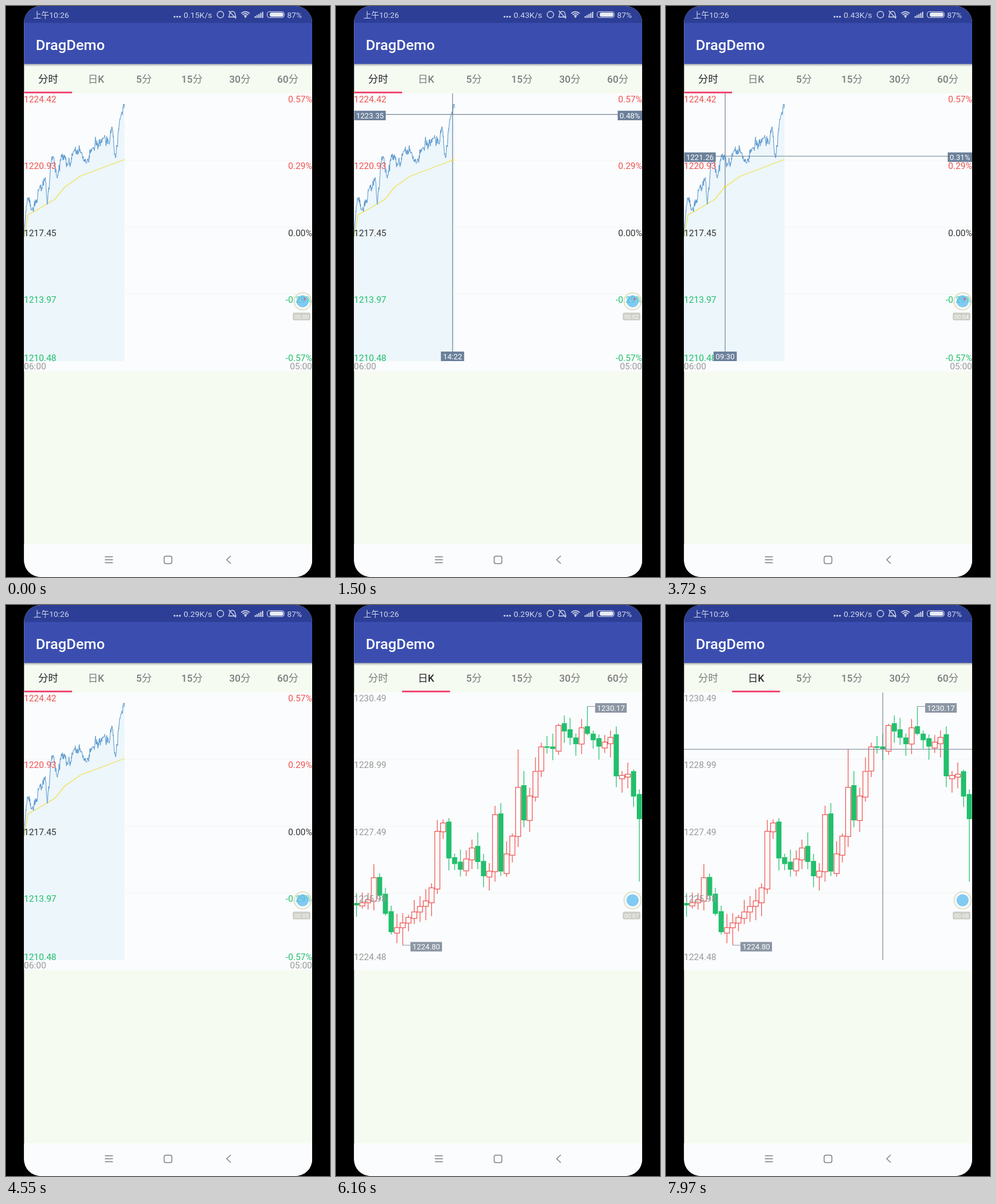
An HTML page with a canvas for the animation above (8000 ms loop, 544x960 px).

```html
<!DOCTYPE html>
<html lang="zh">
<head>
<meta charset="utf-8">
<title>DragDemo</title>
<style>
html, body { margin: 0; width: 100%; height: 100%; overflow: hidden; background: #000; }
canvas { display: block; width: 544px; height: 960px; }
</style>
</head>
<body>
<canvas id="stage" width="544" height="960"></canvas>
<script>
const ctx = document.getElementById('stage').getContext('2d');
const LOOP = 8000, LEFT = 30.5, RIGHT = 514, TOP = 147;
const FONT = 'Roboto, "Noto Sans CJK SC", "Noto Sans CJK", sans-serif';
const BODY = '#f6fbf2', PAPER = '#fbfcfd', ICON = '#d3d9ec', CROSS = '#76889a';
const RED = '#ef5350', GREEN = '#22bf6c', GREY = '#98999a';

// Drawing helpers
function rect(x, y, w, h, color) {
  ctx.fillStyle = color;
  ctx.fillRect(x, y, w, h);
}
function round(x, y, w, h, r) {
  ctx.beginPath();
  ctx.roundRect(x, y, w, h, r);
}
function line(points, color, width = 1.2) {
  ctx.beginPath();
  points.forEach(([x, y]) => ctx.lineTo(x, y));
  ctx.strokeStyle = color;
  ctx.lineWidth = width;
  ctx.stroke();
}
function arc(x, y, r, from = 0, to = Math.PI * 2) {
  ctx.beginPath();
  ctx.arc(x, y, r, from, to);
}
function dot(x, y, r, color) {
  arc(x, y, r);
  ctx.fillStyle = color;
  ctx.fill();
}
function text(str, x, y, size, color, align = 'left', weight = 400) {
  ctx.font = `${weight} ${size}px ${FONT}`;
  ctx.textAlign = align;
  ctx.fillStyle = color;
  ctx.fillText(str, x, y);
}
function tag(str, x, y, w, color) {
  rect(x, y, w, 16, color);
  text(str, x + w / 2, y + 12.7, 12.8, '#fff', 'center');
}

// Motion helpers
const clamp = v => Math.max(0, Math.min(1, v));
const linear = u => u;
const smooth = u => u * u * (3 - 2 * u);
function follow(keys, at, ease = linear) {
  const i = keys.findIndex(k => k[0] >= at);
  if (i === 0) return keys[0][1];
  if (i < 0) return keys[keys.length - 1][1];
  const [x0, y0] = keys[i - 1], [x1, y1] = keys[i];
  return y0 + (y1 - y0) * ease((at - x0) / (x1 - x0));
}
function randomizer(seed) {
  return () => (seed = seed * 16807 % 2147483647) / 2147483647;
}
const labelY = i => Math.min(161.5 + 112.5 * i, 596.5);

// Intraday price: trend through key points, noise between them
const TREND = [
  [30, 388], [36, 322], [43, 343], [56, 308], [66, 288], [69.5, 335], [75.54, 264.7],
  [79, 252], [86, 290], [93, 250], [99.3, 252.5], [103, 268], [113, 245], [127, 246],
  [135, 264], [145, 240], [164, 221], [174, 230], [178, 202], [184.5, 255], [191, 190],
  [195.66, 182.4], [197.5, 165], [199, 172]
];
const AVERAGE = [[30.5, 389], [37, 351], [50, 344], [82, 325], [99, 304], [125, 286], [199, 258]];
const minuteX = m => 30 + m * 0.33;
const hump = u => 4 * u * (1 - u);

function makeSeries() {
  const rand = randomizer(11);
  let drift = 0;
  return Array.from({ length: 513 }, (_, m) => {
    const x = minuteX(m);
    const i = Math.max(1, TREND.findIndex(k => k[0] >= x));
    const u = (x - TREND[i - 1][0]) / (TREND[i][0] - TREND[i - 1][0]);
    drift = drift * 0.75 + (rand() - 0.5) * 14;
    return follow(TREND, x) + drift * hump(u);
  });
}
const series = makeSeries();

// Daily candles: each opens near the last close, wicks are random
const CLOSES = [
  [0, 505], [2, 495], [3, 458], [6, 550], [8, 534], [12, 497], [13, 475], [14, 380], [15, 366],
  [16, 426], [18, 445], [20, 408], [22, 456], [23, 447], [24, 352], [25, 448], [27, 388],
  [28, 306], [29, 362], [32, 238], [34, 242], [35, 202], [38, 234], [39, 206], [42, 238],
  [44, 222], [45, 288], [47, 284], [49, 360]
];
const SPIKES = [[8, 572], [28, 243], [40, 170.5], [49, 465]];

function makeCandles() {
  const rand = randomizer(5);
  const candles = Array.from({ length: 50 }, (_, i) => {
    const close = follow(CLOSES, i), prev = i ? follow(CLOSES, i - 1) : 501;
    const open = prev - Math.sign(close - prev) * 5 * rand();
    const top = Math.min(open, close), bottom = Math.max(open, close);
    return {
      x: 34.5 + i * 9.69, open, close, top, bottom,
      high: top - 2 - 22 * rand(), low: bottom + 2 + 22 * rand()
    };
  });
  SPIKES.forEach(([i, y]) => {
    const c = candles[i];
    c.high = Math.min(c.high, y);
    c.low = Math.max(c.low, y);
  });
  return candles;
}
const candles = makeCandles();

function statusBar(t) {
  rect(30, 0, 485, 29, '#2c3e96');
  text('上午10:26', 46, 20, 13.3, ICON);
  for (let i = 0; i < 3; i++) dot(283 + i * 4.5, 18, 1.6, ICON);
  text((t < 700 ? '0.15' : t < 4500 ? '0.43' : '0.29') + 'K/s', 346, 20, 13.6, ICON, 'right');
  ctx.strokeStyle = ICON;
  ctx.lineWidth = 1.3;
  arc(360, 14.5, 5.5);
  ctx.stroke();
  arc(380, 13.5, 4.5, Math.PI, 0);
  ctx.lineTo(386, 18.5);
  ctx.lineTo(374, 18.5);
  ctx.closePath();
  ctx.stroke();
  line([[374, 8], [386, 21]], ICON);
  for (let r = 3; r < 10; r += 3.2) {
    arc(402, 19, r, -Math.PI * 0.77, -Math.PI * 0.23);
    ctx.lineWidth = 1.7;
    ctx.stroke();
  }
  dot(402, 18.4, 1.4, ICON);
  for (let i = 0; i < 5; i++) rect(417.5 + i * 3.1, 17 - i * 1.8, 2, 3 + i * 1.8, ICON);
  round(438.5, 9.5, 28.5, 10, 4);
  ctx.lineWidth = 1.1;
  ctx.stroke();
  round(443, 11, 22.5, 7, 2.5);
  ctx.fillStyle = '#e6ebf2';
  ctx.fill();
  text('87%', 472, 20, 13.4, ICON);
}

function tabs(t) {
  const press = Math.min(clamp((t - 4950) / 100), clamp((5600 - t) / 300));
  rect(111, 97, 80.5, 50, `rgba(100,100,100,${0.3 * press})`);
  const shade = ctx.createLinearGradient(0, 97, 0, 102);
  shade.addColorStop(0, 'rgba(90,95,110,.5)');
  shade.addColorStop(1, 'rgba(90,95,110,0)');
  rect(30, 97, 485, 5, shade);
  const active = t < 5080 ? 0 : 1;
  ['分时', '日K', '5分', '15分', '30分', '60分'].forEach((name, i) =>
    text(name, 70.7 + i * 80.5, 129, 16.8, i === active ? '#262828' : '#7b7e7c', 'center', 500));
  const slide = smooth(Math.pow(clamp((t - 5000) / 300), 0.82));
  rect(LEFT + slide * 80.5, 144, 80.5, 2.8, '#f2416f');
}

function crosshair(x, y) {
  line([[x, TOP], [x, 597]], CROSS);
  line([[LEFT, y], [RIGHT, y]], CROSS);
}

function intraday(t) {
  const points = series.map((y, m) => [minuteX(m), y]);
  ctx.beginPath();
  [[LEFT, 597], ...points, [199, 597]].forEach(([x, y]) => ctx.lineTo(x, y));
  ctx.fillStyle = '#ecf6fb';
  ctx.fill();
  line(AVERAGE, '#f5df50', 1.3);
  line(points, '#5594cc', 1);

  for (let i = 0; i < 5; i++) {
    const gap = (2 - i) * 3.4849;
    const color = gap > 0 ? RED : gap < 0 ? GREEN : '#333';
    text((1217.45 + gap).toFixed(2), 30, labelY(i), 15, color);
    text((gap / 12.1745).toFixed(2) + '%', RIGHT, labelY(i), 15, color, 'right');
  }
  text('06:00', 30, 611, 15, GREY);
  text('05:00', RIGHT, 611, 15, GREY, 'right');

  if (t < 800 || t > 4200) return;
  const m = Math.round(follow(
    [[800, 508], [1300, 502], [1550, 502], [2500, 138], [2750, 138], [3600, 210]], t, smooth));
  const x = minuteX(m), y = series[m], fill = '#6b809a';
  const price = 1224.42 - (y - 146.4) / 33.6;
  const pad = n => String(n).padStart(2, '0');
  crosshair(x, y);
  dot(x, follow(AVERAGE, x), 2, '#f2d040');
  tag(price.toFixed(2), LEFT, y - 6.3, 53, fill);
  tag((price / 12.1745 - 100).toFixed(2) + '%', 473, y - 6.3, 41, fill);
  tag(`${pad(6 + Math.floor(m / 60))}:${pad(m % 60)}`, x - 19.5, 581, 39, fill);
}

function drawCandle({ x, open, close, top, bottom, high, low }) {
  const rise = close < open, color = rise ? RED : GREEN;
  line([[x, high], [x, top]], color);
  line([[x, bottom], [x, low]], color);
  if (rise) ctx.strokeRect(x - 4.3, top + 0.5, 8.6, Math.max(0, bottom - top - 1));
  else rect(x - 4.3, top, 8.6, Math.max(1, bottom - top), color);
}

function extremeTag(x, y, price, boxY) {
  line([[x, y], [x + 13, y]], '#929aa6');
  tag(price, x + 13, boxY, 53, '#8c96a4');
}

function daily(t) {
  candles.forEach(drawCandle);
  for (let i = 0; i < 5; i++)
    text((1230.49 - i * 1.5024).toFixed(2), 30, labelY(i), 15, GREY);
  const peak = candles.reduce((a, b) => b.high < a.high ? b : a);
  const dip = candles.reduce((a, b) => b.low > a.low ? b : a);
  extremeTag(peak.x, peak.high, '1230.17', peak.high - 5.5);
  extremeTag(dip.x, dip.low, '1224.80', dip.low - 5.5);
  if (t < 6400) return;
  const c = candles[Math.round(follow([[6400, 16], [7140, 24], [7930, 34]], t))];
  crosshair(c.x, c.close + 0.5);
}

function recorder(t) {
  ctx.save();
  ctx.globalAlpha = 0.75;
  dot(498, 496.5, 14.3, 'rgba(255,255,250,.3)');
  ctx.strokeStyle = '#dcdec4';
  ctx.lineWidth = 2.6;
  ctx.stroke();
  dot(498, 496.5, 10.3, '#58baee');
  if (t % 700 < 240) dot(501.5, 492.5, 2, '#e0605c');
  round(481.5, 515.5, 29.5, 13, 2.5);
  ctx.fillStyle = '#bcbfb4';
  ctx.fill();
  ctx.restore();
  text('00:0' + Math.floor(t * 0.00098 + 0.97), 496.3, 525.7, 9.8, '#fff', 'center');
}

function navBar() {
  const color = '#808284';
  rect(30, 905, 485, 55, PAPER);
  for (let y = 926; y < 937; y += 5) line([[166, y], [179.5, y]], color, 1.3);
  round(265.5, 925, 13, 12.5, 3);
  ctx.lineWidth = 1.5;
  ctx.stroke();
  line([[377.5, 924.5], [370.5, 931], [377.5, 937.5]], color, 1.4);
}

function draw(t) {
  rect(0, 0, 544, 960, '#000');
  ctx.save();
  round(30.3, 0, 483.7, 960, 28);
  ctx.clip();
  rect(30, 0, 485, 960, BODY);
  statusBar(t);
  rect(30, 28.5, 485, 69, '#3b4eb0');
  text('DragDemo', 50, 73.7, 24.5, '#fff', 'left', 500);
  tabs(t);
  rect(30, TOP, 485, 467, PAPER);
  for (let i = 1; i < 4; i++) {
    const y = TOP + i * 112.5;
    line([[LEFT, y], [RIGHT, y]], '#f3f6f5', 1);
  }
  if (t < 5030) intraday(t);
  else daily(t);
  recorder(t);
  navBar();
  ctx.restore();
}

const start = performance.now();
function tick() {
  draw((performance.now() - start) % LOOP);
  requestAnimationFrame(tick);
}
tick();
</script>
</body>
</html>
```
